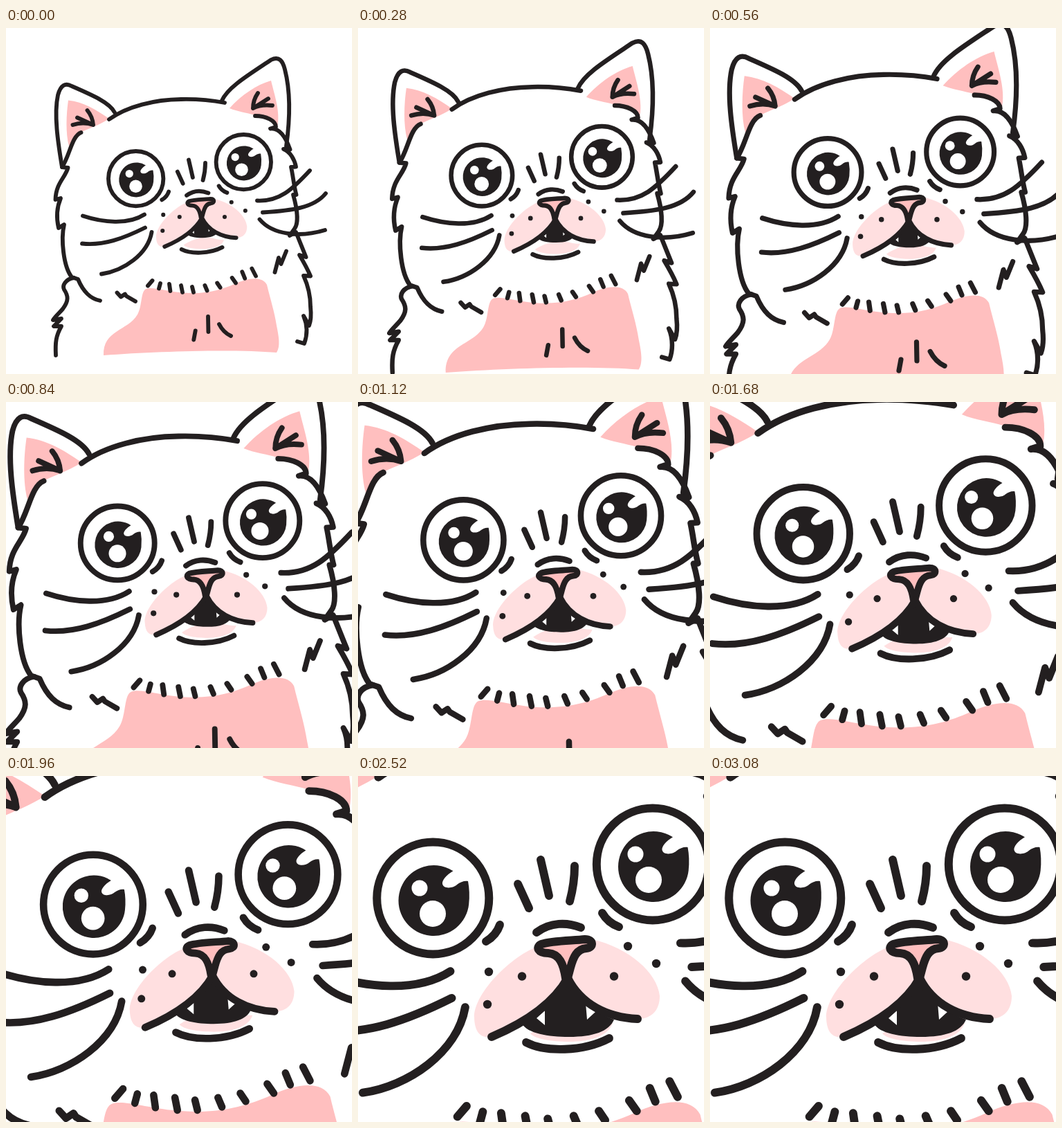
Recreate the animation shown at these times as an HTML page with a canvas. Size 500 by 500 pixels, loop 3220 ms.

```html
<!DOCTYPE html>
<html lang="en">
<head>
<meta charset="utf-8">
<title>Curious cat</title>
<style>
  html, body { margin: 0; width: 100%; height: 100%; overflow: hidden; background: #fff; }
  canvas { display: block; width: 500px; height: 500px; }
</style>
</head>
<body>
<canvas id="stage" width="500" height="500"></canvas>
<script>
const ctx = document.getElementById('stage').getContext('2d');
const INK = '#231f20', PINK = '#ffbfbf', PALE = '#ffdfe0', WHITE = '#fff';
const STEP = 140, LOOP = 3220, ZOOM_STEPS = 18;
const MAX_ZOOM = 2.04, CENTER = { x: 264, y: 257.3 }, LINE = 5.85;

const path = d => new Path2D(d);

// Body parts are laid out at zoom 1.
const body = {
  fills: [
    'M90 104.5C112 107 130 118 149 131C134 141 119 145 108 151C99 156 95 165 91 171C86 152 87 125 90 104.5Z',
    'M323 116C340 97 362 82 383 76C388 97 397 122 392 143L389 140C383 130 372 127 360 126C347 122 335 121 323 116Z',
    'M141 473C140 436 176 438 190 414C196 404 195 385 200 379C205 372 225 379 250 382C285 386 310 379 330 370C350 361 370 358 377 371C382 392 388 410 391 430C394 445 397 460 391 469C330 464 220 467 141 473Z'
  ].map(path),
  lines: [
    // head and ears
    'M149 132C175 113 215 103.500 253 103C275 102.500 300 105 316 108',
    'M81 201C75 165 69 125 75 97C79 82 86 79 95 84C125 97 150 108 157 122',
    'M312 105C320 86 350 68 383 46C395 40 400 48 403 60C412 95 410 135 405 171',
    'M126 140Q125 128 117.500 119M126 140L103 129.500M126 140Q112 135 96.500 140',
    'M357 116Q357 104 364 94M357 116L379 102M357 116Q368 110 385 112',
    // left side
    'M108.500 151C95 156 92 185 81 201L89.500 202C86 216 72 224 71.500 248L79 246C73 260 73 276 76 289L84 284C79 305 83 345 95 360L104 363C112 382 122 391 136 394',
    'M98 361C86 363 81 372 84 378C90 387 91 394 82 406C76 413 71 417 68 422L80 420L69 431L80 431C72 445 71 455 72 473',
    // right side
    'M360 127C376 127 390 134 390 143L382 145.500C396 144 405 160 410.500 175.500L401 175C411 179 417 190 419 200.500L412 201C415 215 416 228 419.500 241L415 241C421 262 423 282 417 290L410 300L419 295C425 310 429 320 433.500 331L424 328C430 338 436 349 440 358.500L430 358C436 371 440 388 440 403C441 412 441 422 438 430L430 416C436 430 435 445 431 456L421 453',
    // whiskers
    'M111 271.500C140 281 176 285 200 269.500',
    'M110 311.500C140 315 170 304 201 288.500',
    'M138 355.500C170 351 205 327 210.500 295',
    'M363 249.500C395 251 413 234 439 206',
    'M371 266.500C413 264 445 260 462 239',
    'M366.500 276.500C385 299 425 303 461 292',
    // chest marks
    'M160.500 382.500L166 388.500L172 384.500L174 387.500L187 395',
    'M405 322.500L397.500 341L394 332L388.500 353',
    'M273.700 437.500L271.300 450.500M292 417L292.400 439M308 428Q314 440 325 445',
    // neck hatching
    'M211.500 365L205 372.500M223 369L221 376.500M236 370L237.400 380M253 372L255 382M269 374L271 382M287.400 372L290.600 379.500M305.200 368.500L309.600 375M326.700 361L332 368.500M341.300 352.300L345.200 361.800M355.300 347.500L361 358.500'
  ].map(path)
};

// The face is laid out at full zoom.
const face = {
  lip: path('M249 372C255 380 280 384 305 384C335 384 362 376 368 357C350 358 335 350 318 350C295 350 270 358 249 372Z'),
  cavity: path('M303 288C282 325 262 342 237 358C245 372 275 377 305 377C340 377 363 369 370 352C342 342 320 325 303 288Z'),
  teeth: path('M270 339L270 360L258 350ZM329 328L343 341L331 352Z'),
  muzzle: path('M265 245C230 253 166 312 168 350C169 372 178 379 193 377C240 357 282 330 303 292C322 330 360 349 404 351C425 351 436 338 436 318C433 285 392 248 338 236Z'),
  nose: path('M300 292C297 272 291 257 275 256C260 256 256 247 265 243C280 238 310 238 328 236C341 236 341 248 330 249C316 250 311 262 307 277L303 292Z'),
  lines: [
    'M193 377C240 357 282 330 303 292C322 330 360 349 404 351',
    'M243 385C270 399 325 399 363 379',
    'M231 156L247 191M264 121L276 173M313 130Q313 155 306 181',
    'M258 226C278 211 302 211 322 219',
    'M205 215Q200 230 185 239M353 198Q361 212 377 218'
  ].map(path),
  dots: [[189, 283], [237, 289.5], [187, 330], [390, 246], [431, 271], [370, 289.5]]
};

function fill(shape, color) {
  ctx.fillStyle = color;
  ctx.fill(shape);
}

function disc(x, y, r, color) {
  ctx.beginPath();
  ctx.arc(x, y, r, 0, Math.PI * 2);
  ctx.fillStyle = color;
  ctx.fill();
}

function zoomTo(k, lineWidth) {
  ctx.setTransform(k, 0, 0, k, CENTER.x * (1 - k), CENTER.y * (1 - k));
  ctx.lineWidth = lineWidth;
}

function drawEye(dx, dy, glintX, shake) {
  ctx.save();
  ctx.translate(dx, dy);
  ctx.beginPath();
  ctx.arc(108.3, 176.5, 81, 0, Math.PI * 2);
  ctx.stroke();
  if (shake) ctx.translate(-5, -6);
  // pupil with a notch at the upper right
  ctx.beginPath();
  ctx.arc(109.5, 180, 51, 0.1, Math.PI * 2 - 0.99);
  ctx.bezierCurveTo(128, 143, 121, 151, 122, 156);
  ctx.bezierCurveTo(124, 164, 138, 162, 143, 157);
  ctx.bezierCurveTo(148, 153, 154, 151, 159, 152);
  ctx.quadraticCurveTo(162, 168, 160.2, 185);
  ctx.fillStyle = INK;
  ctx.fill();
  disc(89 + glintX, 162, 11.5, WHITE);
  disc(108 + glintX, 199, 19, WHITE);
  ctx.restore();
}

function drawMouth(open) {
  fill(face.lip, PALE);
  ctx.save();
  ctx.translate(303, 290);
  ctx.scale(open, open);
  ctx.translate(-303, -290);
  fill(face.cavity, INK);
  fill(face.teeth, WHITE);
  ctx.restore();
}

function draw(time) {
  const step = Math.floor((time % LOOP) / STEP);
  const progress = Math.min(step / ZOOM_STEPS, 1);
  const shake = step > ZOOM_STEPS && (step - ZOOM_STEPS) % 2 === 1;
  const zoom = 1 + (MAX_ZOOM - 1) * progress;

  ctx.setTransform(1, 0, 0, 1, 0, 0);
  ctx.fillStyle = WHITE;
  ctx.fillRect(0, 0, 500, 500);
  ctx.strokeStyle = INK;
  ctx.lineCap = ctx.lineJoin = 'round';

  zoomTo(zoom, LINE);
  body.fills.forEach(shape => fill(shape, PINK));
  body.lines.forEach(line => ctx.stroke(line));

  zoomTo(zoom / MAX_ZOOM, LINE * MAX_ZOOM);
  drawMouth(0.7 + 0.3 * progress);
  fill(face.muzzle, PALE);
  fill(face.nose, PINK);
  ctx.stroke(face.nose);
  face.lines.forEach(line => ctx.stroke(line));
  face.dots.forEach(([x, y]) => disc(x, y, 6.2, INK));
  drawEye(0, 0, 0, shake);
  drawEye(317.5, -49, -5.5, shake);
}

function tick() {
  draw(performance.now());
  requestAnimationFrame(tick);
}
tick();
</script>
</body>
</html>
```
